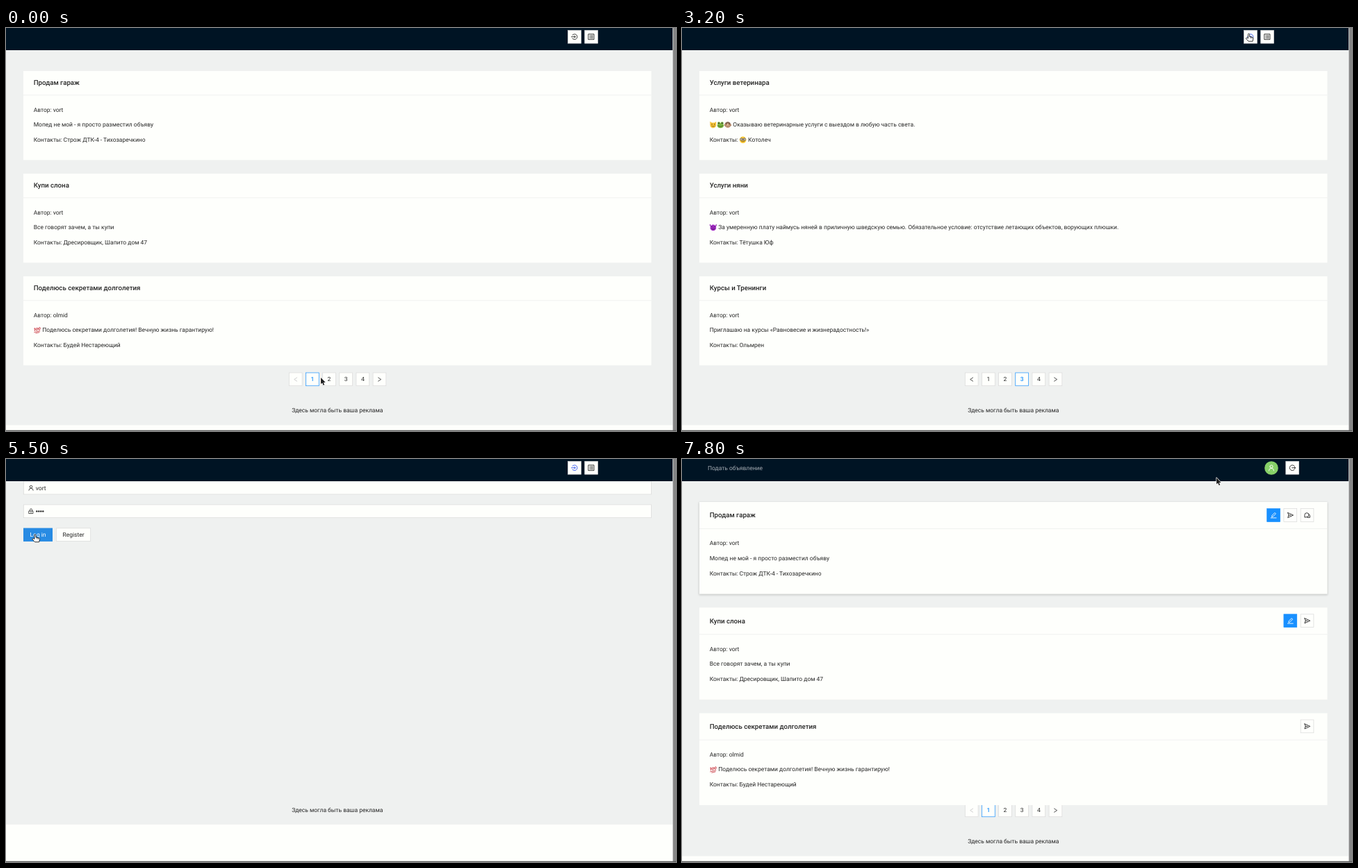
Write an HTML page that moves like this. It is 964 px wide and 581 px high and loops after 8 s.

```html
<!DOCTYPE html>
<html lang="ru">
<head>
<meta charset="utf-8">
<title>Объявления</title>
<style>
html, body { margin: 0; width: 100%; height: 100%; overflow: hidden; background: #eff1f0; }
svg { display: block; width: 964px; height: 581px; }
text { font: 8.47px Roboto, sans-serif; fill: #262626; text-rendering: geometricPrecision; white-space: pre; }
.title { font-size: 9.68px; font-weight: 500; }
.mid { text-anchor: middle; }
.panel text { font: 8.4px "Noto Sans", sans-serif; fill: #222; }
.panel .strong { font-weight: 600; text-anchor: middle; }
.line { fill: none; stroke-linejoin: round; stroke-linecap: round; }
</style>
</head>
<body>
<svg id="stage" viewBox="0 0 964 581"></svg>
<script>
const stage = document.getElementById('stage');
const LOOP = 8000, STEP = 100;
const WHITE = '#fefffc', BLUE = '#1890ff', INK = '#262626', GRAY = '#d9d9d9';
const USER = 'vort', OWNER = 'olmid';

const pages = [
  [
    ['Продам гараж', USER, 'Мопед не мой - я просто разместил объяву', 'Строж ДТК-4 - Тихозаречкино'],
    ['Купи слона', USER, 'Все говорят зачем, а ты купи', 'Дресировщик, Шапито дом 47'],
    ['Поделюсь секретами долголетия', OWNER, '💯 Поделюсь секретами долголетия! Вечную жизнь гарантирую!', 'Будей Нестареющий']
  ], [
    ['Обмен', OWNER, '🔥Отдам в хорошие руки шапку-ушанку для процеживания макарон.', 'еще Мельник Крупёшин'],
    ['💰 Работа', OWNER, '💰 Требуется работник, который умеет вкусно готовить, ухаживать за лошадьми, умело орудовать топором и молотком. В качестве оплаты предоставляю свой лоб для тренировки ловкости пальцев.', 'Дед'],
    ['😍 Знакомства', OWNER, 'Ищу умную, красивую и богатую принцессу, способную вернуть мне веру в справедливость.', 'Демушка-простачок']
  ], [
    ['Услуги ветеринара', USER, '😺🐸🙉 Оказываю ветеринарные услуги с выездом в любую часть света.', '🤓 Котолеч'],
    ['Услуги няни', USER, '😈 За умеренную плату наймусь няней в приличную шведскую семью. Обязательное условие: отсутствие летающих объектов, ворующих плюшки.', 'Тётушка Юф'],
    ['Курсы и Тренинги', USER, 'Приглашаю на курсы «Равновесие и жизнерадостность!»', 'Ольмрен']
  ]
];

// Pointer tip: time, x, y
const route = [
  [0, 453, 504], [500, 453, 504], [700, 465, 504], [900, 465, 504], [1400, 517, 502],
  [1900, 489, 503], [2200, 490, 503], [2600, 725, 185.5], [2900, 838, 45], [3200, 815.5, 8.5],
  [4500, 815.5, 8.5], [5400, 43, 110], [5500, 42, 109], [5900, 42, 109], [6800, 299, 123],
  [7200, 299, 123], [7700, 715, 72], [7800, 769, 27], [8000, 769, 27]
];

const rect = (x, y, w, h, fill, more = '') =>
  `<rect x="${x}" y="${y}" width="${w}" height="${h}" fill="${fill}" ${more}/>`;
const text = (x, y, s, more = '') => `<text x="${x}" y="${y}" ${more}>${s}</text>`;
const path = (d, stroke, width = 1, fill = 'none') =>
  `<path d="${d}" fill="${fill}" stroke="${stroke}" stroke-width="${width}" stroke-linejoin="round" stroke-linecap="round"/>`;
const dot = (x, y, r, fill) => `<circle cx="${x}" cy="${y}" r="${r}" fill="${fill}"/>`;
const box = (x, y, w, h, border = GRAY, fill = WHITE, more = '') =>
  rect(x + .3, y + .3, w - .6, h - .6, fill, `stroke="${border}" stroke-width=".7" ${more}`);
const clamp = v => Math.max(0, Math.min(1, v));

const icons = {
  login: 'M3 3.8A6.5 6.5 0 1 1 3 12.2M.5 8H10M7.5 5.5 10 8 7.5 10.5',
  logout: 'M13 3.8A6.5 6.5 0 1 0 13 12.2M7 8H15.5M13 6 15.5 8 13 10',
  list: 'M1.5 1.5H14.5V14.5H1.5ZM4.5 5h1M4.5 8h1M4.5 11h1M7.5 5h4M7.5 8h4M7.5 11h4',
  send: 'M2 2 15 8 2 14 4 8ZM4 8H9',
  edit: 'M4 11.5 4.5 8.5 11 2 13.5 4.5 7 11ZM1.5 14.5H14.5',
  chat: 'M2 12.5V7.5A5 5 0 1 1 7 12.5ZM12 5.5A4 4 0 0 1 14.5 9.5V13.5H10.5A4 4 0 0 1 7 12.5',
  user: 'M4.5 5a3.5 3.5 0 1 0 7 0a3.5 3.5 0 1 0-7 0M2 15a6 6 0 0 1 12 0',
  lock: 'M2.5 7.5H13.5V14.5H2.5ZM5 7.5V4.5a3 3 0 0 1 6 0V7.5M8 10v2'
};
const icon = (name, cx, cy, color = INK, size = .6) =>
  `<g transform="translate(${cx} ${cy}) scale(${size}) translate(-8 -8)">${path(icons[name], color, 1.5)}</g>`;
const iconButton = (name, x, y, color = INK, fill = WHITE, border = GRAY) =>
  box(x, y, 19.4, 19.4, border, fill) + icon(name, x + 9.7, y + 9.7, color);

// Small pictograms on a 10 by 10 grid
const face = dot(5, 5, 4.6, '#fcc934');
const eyes = dot(3.3, 4.3, .7, '#5a3a1c') + dot(6.7, 4.3, .7, '#5a3a1c');
const smile = path('M3 6.6Q5 8.4 7 6.6', '#5a3a1c', .7);
const heart = x => path(`M${x} 5.4l-1.7-1.8q0-1.6 1.7-.6q1.7-1 1.7.6z`, '#e8303c', .4, '#e8303c');
const emoji = {
  '💯': path('M1 2.8 2 2.2 1.6 6M3.4 3.8q.3-2 1.6-1.9t.6 2.1t-1.6 1.6t-.6-1.8M6.9 3q.3-2 1.6-1.9t.6 2.1t-1.6 1.6t-.6-1.8', '#c8323c', .9) +
    path('M1 8 8.8 6.2M3 9.3 8 8.1', '#c8323c', .8),
  '🔥': path('M4.5.6Q8.8 3.6 8.5 6.8Q8 9.6 5 9.7Q1.6 9.5 1.5 6.5Q1.6 4.8 2.6 3.5L3.4 5Q4.7 3 4.5.6Z', '#f4812c', .3, '#f4812c') +
    path('M5.4 4.5Q7.2 7 6.6 8.4Q5 10 3.5 8.3Q3 7.2 4 6.3Z', '#fcd34a', .3, '#fcd34a'),
  '💰': path('M4 .8H6.6L6.2 2.8Q9.2 5.4 8.8 8.2Q8.4 9.6 5.1 9.6T1.4 8.2Q1 5.4 4.3 2.8Z', '#d9b978', .4, '#ecd09a') +
    path('M6.2 5Q4 4.3 4.1 5.7Q6.4 6.4 6.1 7.5Q5.2 8.4 4 7.6M5.1 4.2V8.5M4.2 2.8H6.2', '#8a6a2c', .7),
  '😍': face + heart(2.9) + heart(7.1) + path('M3 6.5H7Q6.6 8.5 5 8.6T3 6.5', '#5a3a1c', .3, '#5a3a1c'),
  '😺': path('M1 1 3.5 2.4H6.5L9 1V5.5Q8.8 9 5 9.2T1 5.5Z', '#e5a92e', .4, '#fcc934') + eyes + smile,
  '🐸': dot(2.7, 2.7, 1.9, '#7cb342') + dot(7.3, 2.7, 1.9, '#7cb342') +
    '<ellipse cx="5" cy="6" rx="4.6" ry="3.6" fill="#7cb342"/>' + dot(2.7, 2.7, .9, '#333') + dot(7.3, 2.7, .9, '#333') + path('M2 6.3Q5 9 8 6.3', '#33561a', .7),
  '🙉': dot(5, 5, 4.2, '#80604d') + '<ellipse cx="5" cy="6" rx="3" ry="3" fill="#e3b999"/>' +
    dot(1.3, 5.4, 1.4, '#b88a6c') + dot(8.7, 5.4, 1.4, '#b88a6c') + eyes + smile,
  '🤓': face + `<g fill="#fff" stroke="#444" stroke-width=".8"><circle cx="3" cy="4.3" r="1.7"/><circle cx="7" cy="4.3" r="1.7"/></g>` + eyes + smile,
  '😈': path('M.8.8Q.5 3.2 2.4 3.4M9.2.8Q9.5 3.2 7.6 3.4', '#8e24aa', 1.1) + dot(5, 5.4, 4.2, '#a32cc4') +
    path('M2.7 3.8 4 4.6M7.3 3.8 6 4.6M3 6.9Q5 8.4 7 6.9', '#3f1050', .8)
};

// Text whose leading pictograms are drawn as shapes
function richText(x, y, s, size = 8.47, more = '') {
  let out = '', match;
  while ((match = s.match(/^\p{Emoji_Presentation}/u))) {
    out += `<g transform="translate(${x} ${y - size * .93}) scale(${size / 8.2})">${emoji[match[0]]}</g>`;
    x += size * 1.24;
    s = s.slice(match[0].length);
  }
  if (s[0] === ' ') { x += size * .25; s = s.slice(1); }
  return out + text(x, y, s, more);
}

const guest = { height: 128.3, step: 148, head: 34.5 };
const member = { height: 132.6, step: 152.2, head: 38.3 };
const cardTop = (i, layout) => 62 + i * layout.step;

function card(data, i, layout, glow) {
  const [title, author, body, contact] = data, top = cardTop(i, layout), y = top + layout.head + 24;
  const shade = glow ? rect(24.4, top + .6, 904.6, layout.height + 1, '#000', `opacity="${.24 * glow}" filter="url(#soft)"`) : '';
  return shade + rect(25, top, 903.5, layout.height, WHITE) +
    rect(25, top + layout.head, 903.5, .7, '#ebeceb') +
    richText(39.7, top + layout.head / 2 + 3.2, title, 9.68, 'class="title"') +
    text(39.7, y, 'Автор: ' + author) + richText(39.7, y + 21.75, body) +
    text(39.7, y + 43.5, 'Контакты:') + richText(82.5, y + 43.5, contact);
}

const memberTools = [['edit', 'send', 'chat'], ['edit', 'send'], ['send']];
const tools = () => memberTools.map((names, i) => names.map((name, k) => {
  const x = 889.8 - (names.length - 1 - k) * 24.2, y = cardTop(i, member) + 9.3;
  return name === 'edit' ? iconButton(name, x, y, WHITE, BLUE, BLUE) : iconButton(name, x, y);
}).join('')).join('');

const pageX = i => 407 + i * 24.15;
function pagination(page, hovered) {
  let out = '';
  for (let i = 0; i < 6; i++) {
    const x = pageX(i), lit = i === page || (i === hovered && !(i === 0 && page === 1));
    out += box(x, 496.7, 19.4, 19.4, lit ? BLUE : GRAY);
    if (i % 5) out += text(x + 9.7, 509.4, i, `class="mid" style="fill:${lit ? BLUE : INK}${i === page ? ';font-weight:500' : ''}"`);
  }
  return out + path('M418.6 504 414.7 506.6 418.6 509.2', page === 1 ? '#c4c4c4' : INK, .8) +
    path('M535.6 504 539.5 506.6 535.6 509.2', INK, .8);
}

function header(signedIn, lit) {
  const bar = rect(0, 0, 960, 32, '#001424');
  if (signedIn) return bar + text(37, 15.9, 'Подать объявление', 'style="fill:#a6adb4"') +
    dot(848, 13, 9.8, '#87d068') + icon('user', 848, 12.7, WHITE) + iconButton('logout', 868.5, 3);
  return bar + iconButton('login', 808.3, 3, lit ? '#2f54eb' : INK) + iconButton('list', 832.4, 3);
}

const bullets = (x, y) => [0, 1, 2, 3].map(i => dot(x + i * 3, y, 1.2, INK)).join('');
const form = pressed => box(25, 31.8, 903.8, 19.4) + icon('user', 36, 41.6, INK, .52) + text(42.8, 44.6, USER) +
  box(25, 65.6, 903.8, 19.4) + icon('lock', 36, 75.2, INK, .52) + bullets(44.3, 75.4) +
  rect(25, 99.5, 42, 19.4, pressed ? '#288be3' : BLUE) + text(46, 112.3, 'Log in', 'class="mid" style="fill:#fff"') +
  box(72, 99.5, 50, 19.4) + text(97, 112.3, 'Register', 'class="mid"');

function passwordPanel(opacity, shift) {
  const under = s => `<tspan text-decoration="underline">${s}</tspan>`;
  return `<g class="panel" opacity="${opacity}" transform="translate(0 ${shift})">` +
    rect(125, -20, 275, 160, '#000', 'rx="4" opacity=".3" filter="url(#soft)"') +
    rect(125, -20, 275, 159, '#fdfefc', 'rx="4"') +
    text(134.6, 12.6, 'Username') + box(134.6, 17, 255, 20, '#8b8b92', WHITE, 'rx="2"') + text(139, 30.2, USER) +
    path('M378.5 26 381 28.6 383.5 26', '#444', .9) +
    text(134.6, 56, 'Password') + box(134.6, 60.3, 255, 20, '#8b8b92', WHITE, 'rx="2"') + bullets(140.8, 70.7) +
    box(134.8, 91.5, 9.2, 9.2, '#999', '#eeeeec', 'rx="1"') + text(147.8, 99.2, `S${under('h')}ow password`, 'style="fill:#555"') +
    rect(259.4, 109.5, 85, 20, '#e9eaeb', 'rx="2"') + rect(259.4, 109.5, 64.8, 20, '#c9ccd0', 'rx="2"') +
    text(292, 122.5, `${under('D')}on’t save`, 'class="strong"') + path('M331.5 118 334.6 121.2 337.7 118', '#333', 1) +
    rect(349.4, 109.5, 40.4, 20, '#e9eaeb', 'rx="2"') + text(369.6, 122.5, `${under('S')}ave`, 'class="strong"') + '</g>';
}

const tooltip = opacity => `<g opacity="${opacity}">` +
  rect(806, 29, 23.5, 17.5, '#000', 'rx="1" opacity=".3" filter="url(#soft)"') + rect(806, 28.5, 23.5, 17, '#2f54eb') +
  text(817.7, 39.8, 'Вход', 'class="mid" style="font-size:7.6px;fill:#fff"') + '</g>';

function pointer({ x, y }, hand) {
  const shape = hand
    ? path('M-1 6V.8Q-1-.4 0-.4T1 .8V4L5 4.8Q6.7 5.1 6.4 6.6L5.6 10.7H-.4L-4 6.9Q-4.4 5.7-3 5.6Z', '#222', .9, '#fff') +
      path('M2.7 4.5V6.3M4.5 4.9V6.5', '#222', .6)
    : path('M0 0V9.3L2.1 7.5 3.6 10.9 5.2 10.2 3.7 6.9H6.6Z', '#fff', 1.2, '#222') +
      path('M0 0V9.3L2.1 7.5 3.6 10.9 5.2 10.2 3.7 6.9H6.6Z', 'none', 0, '#222');
  return `<g transform="translate(${x} ${y})">${shape}</g>`;
}

function pointerAt(t) {
  const k = Math.max(1, route.findIndex(p => p[0] >= t));
  const [t0, x0, y0] = route[k - 1], [t1, x1, y1] = route[k], f = clamp((t - t0) / (t1 - t0));
  return { x: x0 + (x1 - x0) * f, y: y0 + (y1 - y0) * f };
}

const inside = (p, x, y, w, h) => p.x >= x && p.x <= x + w && p.y >= y && p.y <= y + h;
const isForm = t => t >= 4300 && t < 6400;
const isPanel = t => t >= 6400 && t < 7100;
const layoutAt = t => t >= 6400 ? member : guest;

function hoveredCard(t) {
  if (t < 0 || isForm(t) || isPanel(t)) return -1;
  const p = pointerAt(t), layout = layoutAt(t);
  return [0, 1, 2].findIndex(i => inside(p, 25, cardTop(i, layout), 903.5, layout.height));
}
// Card shadows ease in and out over three steps
const glowAt = (t, i) => [0, 1, 2].filter(n => hoveredCard(t - n * STEP) === i).length / 3;

function scene(t) {
  const p = pointerAt(t), signedIn = t >= 6300, layout = layoutAt(t), formOpen = isForm(t);
  const page = t < 800 || t >= 6400 ? 1 : t < 2200 ? 2 : 3;
  const onPage = formOpen ? -1 : [0, 1, 2, 3, 4, 5].findIndex(i => inside(p, pageX(i), 496.7, 19.4, 19.4));
  const onLogin = !signedIn && inside(p, 808, 3, 20, 20);
  const onSubmit = formOpen && !signedIn && inside(p, 25, 99.5, 42, 19.4);
  const hand = onPage >= 0 || onLogin || onSubmit || hoveredCard(t) >= 0;
  const end = formOpen ? 527 : 572.5;

  let out = `<defs><filter id="soft" x="-20%" y="-20%" width="140%" height="140%"><feGaussianBlur stdDeviation="1.7"/></filter></defs>` +
    rect(0, 0, 964, 581, '#eff1f0') + rect(0, end, 960, 581 - end, WHITE) +
    text(476.8, formOpen ? 509.2 : 554.4, 'Здесь могла быть ваша реклама', 'class="mid"');
  if (!formOpen) {
    out += pagination(page, onPage) + pages[page - 1].map((data, i) => card(data, i, layout, glowAt(t, i))).join('');
    if (signedIn) out += tools();
  } else if (!signedIn) out += form(onSubmit);
  out += header(signedIn, t >= 3100);

  const tip = clamp((t - 3950) / 250) * clamp((4800 - t) / 200);
  if (tip) out += tooltip(tip);
  if (isPanel(t)) out += passwordPanel(t < 6500 ? .5 : t >= 7000 ? .4 : 1, t < 6500 ? -12 : 0);
  return out + rect(959, 0, 1, 581, '#c0c0c0') + rect(960, 0, 4, 581, '#868686') +
    rect(0, 579.8, 964, 1.2, '#5c5c5c') + pointer(p, hand);
}

let shown = -1;
function tick() {
  const t = Math.floor(performance.now() % LOOP / STEP) * STEP;
  if (t !== shown) stage.innerHTML = scene(shown = t);
  requestAnimationFrame(tick);
}
tick();
</script>
</body>
</html>
```
